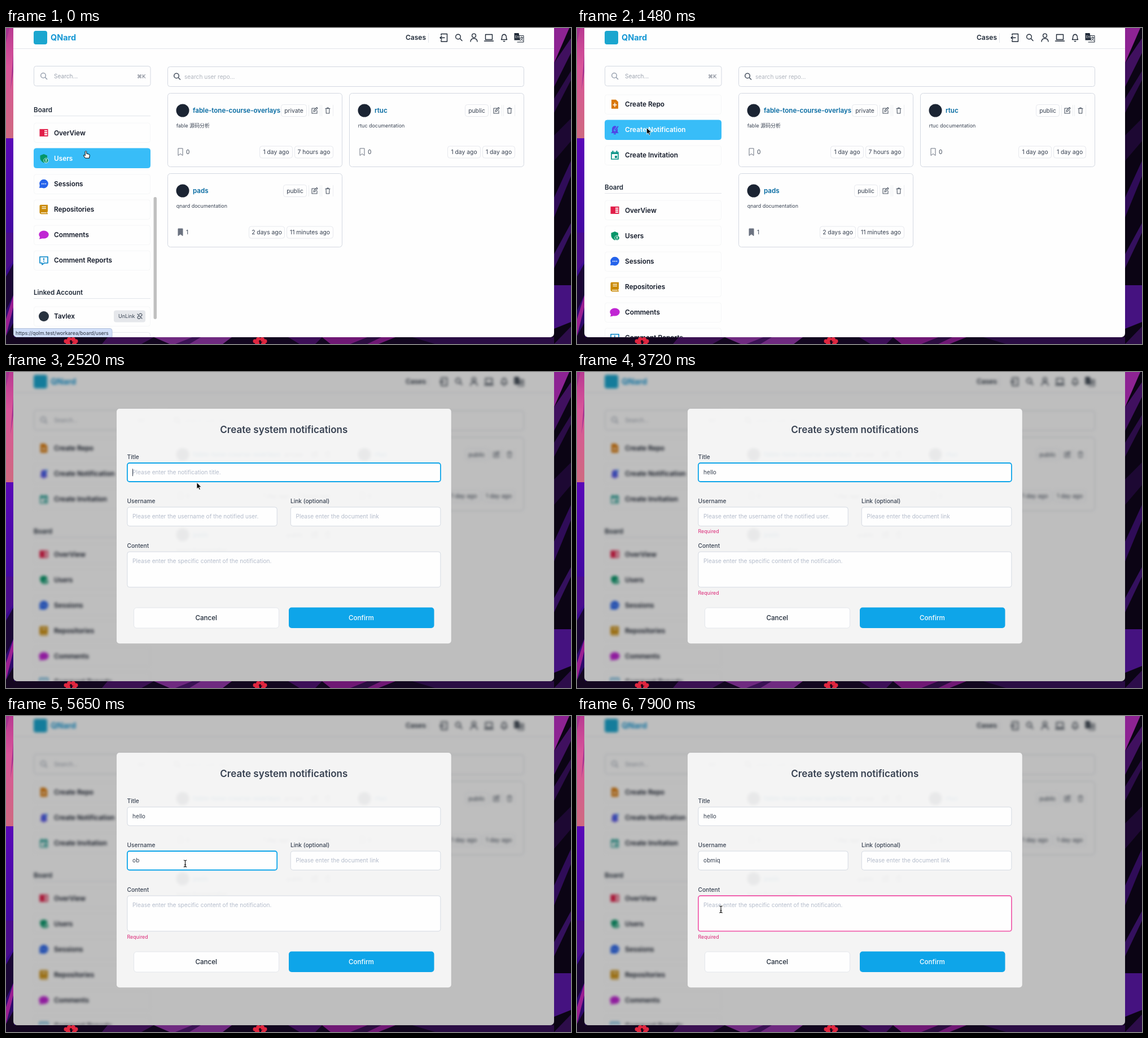
These frames come from a looping animation (1001x559 px, 8 s). An HTML page:

```html
<!DOCTYPE html>
<html lang="en">
<head>
<meta charset="utf-8">
<title>Create notification</title>
<style>
  html, body { margin: 0; width: 100%; height: 100%; overflow: hidden; background: #12061f; }
  svg { display: block; }
  text { font: 400 10.1px Inter, "Noto Sans CJK SC", "Noto Sans CJK", "DejaVu Sans", sans-serif; fill: #374151; }
  .item { font-size: 11.8px; font-weight: 600; fill: #111827; }
  .head { font-size: 11.6px; font-weight: 600; fill: #1f2937; }
  .name { font-size: 11.55px; font-weight: 600; fill: #0369a1; }
  .desc { font-size: 8.95px; fill: #374151; }
  .tag { font-size: 10.35px; text-anchor: middle; }
  .hint { fill: #9ca3af; }
  .ph { font-size: 10.1px; fill: #b4bccb; }
  .val { font-size: 10.1px; fill: #374151; }
  .label { font-size: 10.2px; font-weight: 500; }
  .err { font-size: 8.8px; fill: #db2777; }
  .btn { font-size: 11.6px; font-weight: 500; fill: #1f2937; text-anchor: middle; }
  .box { fill: none; stroke: #d3d8e1; }
  .soft { fill: none; stroke: #e7e9ee; }
  .line { stroke: #e2e5ea; fill: none; }
  .ico { fill: none; stroke: #1f2937; stroke-width: 1.4; stroke-linejoin: round; stroke-linecap: round; }
  .thin { stroke: #4b5563; stroke-width: 1.1; }
  .row rect { fill: #fefefe; stroke: #f5f6f7; }
  .row.on rect { fill: #38bdf8; stroke: #38bdf8; }
  .row.on text { fill: #fff; }
  .field { fill: #fefefe; stroke: #d5dae2; stroke-width: 1; }
  .field.focus { stroke: #0ea5e9; stroke-width: 1.8; }
  .field.focus.bad { stroke: #f062ae; }
  #app.blur { filter: blur(2.6px); }
  #modal { transform-origin: 492.25px 272.5px; }
</style>
</head>
<body>
<svg width="1001" height="559" viewBox="0 0 1001 559">
  <defs>
    <linearGradient id="pink" x2="0" y2="1">
      <stop offset="0" stop-color="#b93a92"/><stop offset=".35" stop-color="#d9559a"/><stop offset="1" stop-color="#cf6a80"/>
    </linearGradient>
    <linearGradient id="violet" x2="0" y2="1">
      <stop offset="0" stop-color="#5a08b8"/><stop offset=".5" stop-color="#4108a0"/><stop offset="1" stop-color="#2a0a5c"/>
    </linearGradient>
    <linearGradient id="grey" x2="0" y2="1">
      <stop offset="0" stop-color="#a9a9a9"/><stop offset="1" stop-color="#7f7f7f"/>
    </linearGradient>
    <filter id="shade" x="-20%" y="-40%" width="140%" height="190%">
      <feDropShadow dx="0" dy="3" stdDeviation="4" flood-opacity=".35"/>
    </filter>
    <clipPath id="win"><path d="M13 0H971V540a7 7 0 0 1-7 7H20a7 7 0 0 1-7-7Z"/></clipPath>
    <clipPath id="side"><rect x="40" y="106" width="222" height="441"/></clipPath>

    <!-- sidebar icons, centred on 0,0 -->
    <g id="file"><path d="M-6-8H2L6-4V8H-6Z" fill="#d97706"/><path d="M0-2.500V5M-3.500 1.300H3.500" stroke="#fff" stroke-width="1.500"/></g>
    <g id="bell"><path d="M-5 4V-1Q-5-6 0-7Q5-6 5-1V4L7 6H-7Z" fill="#4f46e5"/><path d="M-1 2L6-7" stroke="#38bdf8" stroke-width="3.200"/><path d="M0 1L6-6M-2 7.500H2" stroke="#4f46e5" stroke-width="1.800"/></g>
    <g id="cal"><path d="M-6-5H6V7H-6Z" fill="none" stroke="#0d9488" stroke-width="1.700"/><path d="M-6-3H6M-3.500-8V-4M3.500-8V-4" stroke="#0d9488" stroke-width="2"/><path d="M0 1H4V5H0Z" fill="#0d9488"/></g>
    <g id="view"><path d="M-7.500-6.500H7.500V6.500H-7.500Z" fill="#e11d48"/><path d="M1-4.500H6V4.500H1Z" fill="#fff"/><path d="M1-2H6M1 1.500H6" stroke="#e11d48" stroke-width="1.200"/></g>
    <g id="shield"><path d="M-6.500-5L0-7.500L6-5V0Q5 6 0 8Q-6 5-6.500 0Z" fill="#059669"/><circle cx="4" cy="4" r="4.200" fill="#059669" stroke="#fff" stroke-width=".8"/><path d="M2 6Q4 3.500 6 6" fill="#fff"/><circle cx="4" cy="2.800" r="1.200" fill="#fff"/></g>
    <g id="dots"><circle r="7.800" fill="#2563eb"/><path d="M-8 7.500L-7 2L-2 7Z" fill="#2563eb"/><path d="M-4 0h1.700M-.8 0h1.700M2.400 0h1.700" stroke="#fff" stroke-width="1.700"/></g>
    <g id="book"><path d="M-5.500-8H7V4.500H6V7H7V8.500H-5Q-7.500 8-7.500 5.500V-6Q-7.500-8-5.500-8Z" fill="#ca8a04"/><path d="M-3.500-4.500H4M-3.500-1.500H4M-5 6H5" stroke="#fff" stroke-width="1.300"/></g>
    <g id="chat"><ellipse cy="-.5" rx="8.700" ry="7" fill="#c026d3"/><path d="M-8 7.500L-6 1L-1 6Z" fill="#c026d3"/></g>
    <g id="alert"><path d="M-7-6.500H7V4.500H1L-3 7.500V4.500H-7Z" fill="none" stroke="#0284c7" stroke-width="1.600" stroke-linejoin="round"/><path d="M0-4.500V0M0 1.300V2.800" stroke="#0284c7" stroke-width="1.600"/></g>
    <circle id="mark" r="9" fill="#28323f"/>

    <g id="edit" class="ico thin"><path d="M1-4H-4.500V5H4.500V0M-1.500 2L-1-.5L4-5.500L5.500-4L.8 1.300Z"/></g>
    <g id="bin" class="ico thin"><path d="M-4-3.500H4M-3-3.500L-2.700 5H2.700L3-3.500M-1.300-3.500V-5H1.300V-3.500"/></g>
    <path id="flag" d="M-4-6.500H4V6L0 3L-4 6Z" stroke="#6b7280" stroke-linejoin="round"/>
    <g id="lens"><circle r="4.300" cx="-1" cy="-1" fill="none"/><path d="M2.300 2.300L6 6"/></g>
    <g id="bloom" fill="#e0263f"><circle cx="-9" cy="1" r="3.500"/><circle cx="9" cy="1" r="3.500"/><circle cx="-3" cy="-2" r="4"/><circle cx="4" cy="-2" r="4"/><circle cx="-5" cy="5" r="4"/><circle cx="6" cy="6" r="4"/><circle cy="1" r="2" fill="#2a0614"/></g>
  </defs>

  <g id="desk">
    <path d="M0 0H1001V559H0Z" fill="#12061f"/>
    <path d="M0 0H16V195H0Z" fill="url(#pink)"/><path d="M0 0H6L0 26ZM14 30V70L8 110Z" fill="#a5348f"/>
    <path d="M0 195H16V559H0Z" fill="url(#violet)"/>
    <path d="M0 362H14V410L0 430Z" fill="#4a0c8e"/><path d="M0 440L14 415V470L0 500Z" fill="#1a0735"/>
    <path d="M0 515L14 470V490L0 545Z" fill="#9a1f92"/><path d="M0 559V545L14 520V547H100V559Z" fill="#140620"/>
    <path d="M180 547H262L240 559H170Z" fill="#3b1152"/><path d="M262 547H400L384 559H290Z" fill="#6f2a80"/>
    <path d="M300 559L330 547H345L325 559Z" fill="#3a1254"/><path d="M500 547H560L548 559H520Z" fill="#3d0f58"/>
    <path d="M560 547H690L660 559H575Z" fill="#6f1874"/><path d="M610 559L640 547H665L640 559Z" fill="#2b0d40"/>
    <path d="M720 547H971V559H760Z" fill="#2a0d44"/>
    <use href="#bloom" x="115" y="553"/><use href="#bloom" x="450" y="553"/>
    <path d="M971 0H1001V559H971Z" fill="#0b0414"/>
    <path d="M971 0H998L971 62Z" fill="#8d2393"/><path d="M971 62L1001 18V44L971 104Z" fill="#40105f"/>
    <path d="M971 125L1001 76V92L971 150Z" fill="#2b0c48"/><path d="M971 190L1001 160V200L971 235Z" fill="#1d0833"/>
    <path d="M971 300L1001 235V262L971 335Z" fill="#2f0c58"/><path d="M971 400L1001 345V362L971 425Z" fill="#34105e"/>
    <path d="M971 455H1001V520L971 532Z" fill="#451280"/><path d="M971 559L1001 528V559Z" fill="#2d0d4a"/>
  </g>

  <g clip-path="url(#win)">
    <path d="M13 0H971V547H13Z" fill="#fefefe"/>
    <g id="app">
      <rect x="49" y="5" width="24" height="24" rx="4" fill="#1ba6cf"/>
      <text x="79" y="22.300" style="font-size:14.400px;font-weight:700;fill:#1497d4">QNard</text>
      <text x="708" y="21.400" class="item" style="font-size:12px;fill:#1f2937">Cases</text>
      <path class="line" d="M748.500 9V26M13 36.500H971"/>
      <g class="ico">
        <path d="M771 12.500V10.500H781.500V24H771V21.500M769 17.200H777M772 14.500L769 17.200L772 20"/>
        <use href="#lens" x="802" y="16.500"/>
        <circle cx="829" cy="13.500" r="3.400"/><path d="M823 24Q823.500 18.500 829 18.500T835 24"/>
        <path d="M849.500 11.500H861.500V20.500H849.500ZM847.500 23H863.500"/>
        <path d="M877.500 20.500Q878.700 19 878.700 15.500Q879 12 882.500 11.300Q886 12 886.300 15.500Q886.300 19 887.500 20.500ZM881.300 23.500H883.700"/>
        <path d="M909 13.500H917V25H906" stroke-width="1"/><path d="M911 17H916M913.500 15.500V17M915.500 17Q914.500 21 911 22.500M911.500 18.500L916 22.500" stroke-width=".9"/>
      </g>
      <path d="M900.500 9H908.500L911 21.500H900.500Z" fill="#1f2937"/><text x="902" y="17.500" style="font-size:6px;fill:#fff">En</text>

      <rect class="box" x="49.500" y="67.500" width="206.500" height="35" rx="4"/>
      <use href="#lens" x="67" y="85" stroke="#8b95a5" stroke-width="1.300"/>
      <text x="85" y="89" class="hint">Search...</text><text x="232" y="89" style="font-size:9.300px;fill:#6b7280">⌘K</text>
      <rect class="box" x="286.500" y="68.500" width="631" height="35" rx="4"/>
      <use href="#lens" x="303" y="85.500" stroke="#4b5563" stroke-width="1.600"/>
      <text x="316" y="90" class="hint" style="fill:#b0b5be">search user repo...</text>
      <g id="cards"></g>
      <g clip-path="url(#side)"><g id="list"></g></g>
    </g>
    <rect id="thumb" x="261.500" width="5.500" height="216" rx="2.700" fill="#c0c0c0"/>
    <g id="status">
      <path d="M13 531.500H184a4 4 0 0 1 4 4V547H13Z" fill="#d0def8" stroke="#b4c2dc"/>
      <text x="17" y="542.600" style="font-size:8.850px;fill:#28303c">https://qolm.test/workarea/board/users</text>
    </g>
    <path id="dim" d="M13 0H971V547H13Z" opacity=".25"/>
  </g>

  <g id="modal">
    <rect x="196" y="65" width="592.700" height="415.300" rx="5" fill="#f9f9f9" fill-opacity=".93"/>
    <text x="492.300" y="107.500" text-anchor="middle" style="font-size:17px;font-weight:600">Create system notifications</text>
    <g id="form"></g>
    <text class="err" id="userErr" x="214.500" y="285">Required</text>
    <text class="err" id="bodyErr" x="214.500" y="393.500">Required</text>
    <rect x="226.500" y="417" width="257" height="36" rx="5" fill="#fefefe" stroke="#e3e6eb"/><text class="btn" x="354.700" y="439">Cancel</text>
    <rect x="501" y="416.500" width="257.500" height="36.500" rx="5" fill="#0ea5e9"/><text class="btn" x="629.500" y="439" style="fill:#fff">Confirm</text>
    <path id="caret" d="M0-6.500V6.500" stroke="#374151"/>
  </g>

  <g id="tip">
    <rect x="215" y="275" width="225.500" height="50" rx="6" fill="#d2d2d2" stroke="#b4b4b4" stroke-width=".6" filter="url(#shade)"/>
    <rect x="226" y="287" width="26" height="26" rx="6" fill="url(#grey)"/>
    <circle cx="239" cy="294.500" r="4.300" fill="#fff"/><circle cx="239" cy="293" r="1.200" fill="#999"/>
    <path d="M237.500 298H240.500V303L242 304.500L240.500 306L241.500 307.500L239 310L237.500 308.500Z" fill="#fff"/>
    <text x="262" y="292" style="font-size:10.400px;font-weight:700;fill:#111">启用密码自动填充</text>
    <text x="262" y="306" style="font-size:8.900px;fill:#111">单击此处以允许 oVelmu 密码自动填充密</text>
    <text x="262" y="318" style="font-size:8.900px;fill:#111">码。</text>
  </g>

  <g id="pointer">
    <path id="arrow" d="M0 0V11.300L2.700 8.900L4.500 13L6.400 12.100L4.600 8.200H8.200Z" fill="#000" stroke="#fff" stroke-width=".8"/>
    <path id="hand" d="M-1.300 1Q0-.8 1.300 1V4.800L5.500 5.800Q7 6.300 6.800 8L6 12.700H-1L-4 8.600Q-4.500 7-3 7.200L-1.300 8.400Z" fill="#fff" stroke="#000" stroke-linejoin="round"/>
    <g id="beam" fill="none">
      <path d="M-2.700-6Q0-6 0-4V4Q0 6-2.700 6M2.700-6Q0-6 0-4M2.700 6Q0 6 0 4M-1.700 2H1.700" stroke="#fff" stroke-width="2.600"/>
      <path d="M-2.700-6Q0-6 0-4V4Q0 6-2.700 6M2.700-6Q0-6 0-4M2.700 6Q0 6 0 4M-1.700 2H1.700" stroke="#111" stroke-width="1.100"/>
    </g>
  </g>
</svg>

<script>
const $ = id => document.getElementById(id);
const use = (id, x, y) => `<use href="#${id}" x="${x}" y="${y}"/>`;
const text = (cls, x, y, s) => `<text class="${cls}" x="${x}" y="${y}">${s}</text>`;
const tag = (l, r, y, s) =>
  `<rect class="soft" x="${l + .5}" y="${y - 10.5}" width="${r - l - 1}" height="21" rx="4"/>` + text('tag', (l + r) / 2, y + 3.7, s);

// Repository cards
function card(x, y, name, desc, access, saved, created, updated) {
  const w = access === 'private' ? 46 : 42, r = x + 294, mid = y + 30, low = y + 103.5;
  const l = r - updated[1];
  return `<rect class="box" x="${x + .5}" y="${y - .5}" width="309" height="130" rx="5"/>
    <circle cx="${x + 27}" cy="${mid}" r="11.5" fill="#1b2433"/>` +
    text('name', x + 45, mid + 4.3, name) + text('desc', x + 15.7, y + 60, desc) +
    tag(x + 247 - w, x + 247, mid, access) +
    `<path stroke="#eceef1" d="M${x + 250.5} ${mid - 10}v20m20 0v-20m3 0v20m20 0v-20"/>` +
    use('edit', x + 260.5, mid) + use('bin', x + 284, mid) +
    `<use href="#flag" x="${x + 23}" y="${low}" fill="${saved ? '#6b7280' : 'none'}"/>` +
    text('', x + 33, low + 3.7, saved) +
    tag(l - 3 - created[1], l - 3, low, created[0]) + tag(l, r, low, updated[0]);
}
$('cards').innerHTML =
  card(286, 116, 'fable-tone-course-overlays', 'fable 源码分析', 'private', 0, ['1 day ago', 59], ['7 hours ago', 69]) +
  card(608, 116, 'rtuc', 'rtuc documentation', 'public', 0, ['1 day ago', 59], ['1 day ago', 58]) +
  card(286, 258, 'pads', 'qnard documentation', 'public', 1, ['2 days ago', 64], ['11 minutes ago', 83]);

// Sidebar
const rows = [
  ['Create Repo', 'file', -2.3], ['Create Notification', 'bell', 42.9], ['Create Invitation', 'cal', 88],
  ['OverView', 'view', 185.3], ['Users', 'shield', 230.4], ['Sessions', 'dots', 275.6],
  ['Repositories', 'book', 320.8], ['Comments', 'chat', 366], ['Comment Reports', 'alert', 411.2],
  ['Tavlex', 'mark', 510]
];
const heading = (y, s) => text('head', 49, y, s) + `<path class="line" d="M49 ${y + 6.5}H256"/>`;
$('list').innerHTML = rows.map(([s, icon, y]) =>
  `<g class="row"><rect x="49.5" y="${Math.round(y) - 17}" width="206" height="34.500" rx="4"/>${use(icon, 67, y)}${text('item', 85, y + 4.2, s)}</g>`
).join('') + heading(149, 'Board') + heading(472, 'Linked Account') +
  '<rect class="soft" x="49.5" y="538.5" width="206" height="35" rx="4"/>' +
  '<rect x="191" y="499.500" width="56" height="21" rx="4" fill="#e5e7eb"/>' + text('desc', 199, 513.300, 'UnLink') +
  '<path class="ico thin" d="M236 506.500l2-1.500q3 0 3 3l-2 2M238 513l-2 1.500q-3 0-3-3l2-2M233 506l8 8"/>';
const rowEls = [...document.querySelectorAll('.row')];

// Form
const fields = {
  title: ['Title', 214.9, 161, 555, 33, 'Please enter the notification title.'],
  user: ['Username', 214.9, 239, 265.3, 33.5, 'Please enter the username of the notified user.'],
  link: ['Link (optional)', 504.3, 239, 265.6, 33.5, 'Please enter the document link'],
  body: ['Content', 214.9, 318, 555, 62.7, 'Please enter the specific content of the notification.']
};
$('form').innerHTML = Object.entries(fields).map(([id, [label, x, y, w, h, hint]]) =>
  text('label', x - .4, y - 7.3, label) +
  `<rect class="field" id="${id}" x="${x}" y="${y}" width="${w}" height="${h}" rx="4"/>
   <text class="ph" id="${id}Hint" x="${x + 9.2}" y="${y + 20.4}">${hint}</text>
   <text class="val" id="${id}Val" x="${x + 9.2}" y="${y + 20.4}"></text>`).join('');

// Stepped timeline: each entry is [ms, ...values]
const scroll = [[0, 0], [140, 22], [290, 78], [440, 122], [590, 137]];
const pointer = [
  [0, 141.5, 217.5, 'hand'], [440, 141, 217, 'arrow'], [890, 139, 212, 'arrow'], [1040, 133, 200, 'arrow'],
  [1190, 127, 186, 'arrow'], [1340, 124, 178, 'arrow'], [1480, 123.5, 176.5, 'arrow'], [1780, 150, 180, 'arrow'],
  [1930, 204, 184, 'arrow'], [2080, 262, 187, 'beam'], [2230, 310, 190, 'beam'], [2380, 332, 195, 'arrow'],
  [2520, 338, 195.5, 'arrow'], [2970, 0, 0, ''], [4020, 338, 197, 'arrow'], [4170, 335, 206, 'arrow'],
  [4320, 327, 230, 'arrow'], [4470, 319, 255, 'beam'], [4600, 317.5, 261, 'beam'], [6400, 314, 267, 'beam'],
  [6550, 291, 303, 'arrow'], [6700, 267, 334, 'beam'], [7000, 257, 341, 'beam'], [7150, 255, 342, 'beam']
];
const modal = [[0, 1, 0], [1630, .943, .73], [1780, .988, .93], [1930, 1, 1]];
const focus = [[0, ''], [1630, 'title'], [4600, 'user'], [7150, 'body']];
const caret = [[0, 0], [1630, 1], [2080, 0], [2520, 1], [2970, 0], [4600, 1], [4900, 0], [5200, 1], [5650, 0], [7150, 1], [7900, 0]];
const typed = {
  title: [[0, ''], [2970, 'he'], [3120, 'hel'], [3270, 'hell'], [3720, 'hello']],
  user: [[0, ''], [4900, 'ob'], [5950, 'obm'], [6100, 'obmiq']]
};
const at = (track, t) => track.findLast(k => k[0] <= t).slice(1);
const show = (id, on) => $(id).style.display = on ? '' : 'none';

function draw(t) {
  const [dy] = at(scroll, t), [px, py, kind] = at(pointer, t);
  const [scale, alpha] = at(modal, t), [active] = at(focus, t), open = alpha > 0;

  $('list').setAttribute('transform', `translate(0 ${dy})`);
  rowEls.forEach((el, i) => el.classList.toggle('on', !open && Math.abs(rows[i][2] + dy - py) < 17.8));
  $('thumb').setAttribute('y', 299 - dy * .49);
  show('thumb', t < 1040);
  show('status', t < 890);

  $('app').classList.toggle('blur', open);
  show('dim', open);
  show('modal', open);
  $('modal').style.transform = `scale(${scale})`;
  $('modal').style.opacity = alpha;

  for (const id in typed) {
    const [s] = at(typed[id], t);
    $(id + 'Val').textContent = s;
    show(id + 'Hint', !s);
  }
  for (const id in fields) $(id).classList.toggle('focus', id === active);
  const invalid = t >= 2970, noUser = invalid && t < 4900;
  $('user').classList.toggle('bad', noUser);
  $('body').classList.toggle('bad', invalid);
  show('userErr', noUser);
  show('bodyErr', invalid);
  show('tip', t >= 4750 && t < 4900);

  const blink = open && at(caret, t)[0];
  show('caret', blink);
  if (blink) {
    const [, x, y] = fields[active];
    const w = active in typed ? $(active + 'Val').getComputedTextLength() : 0;
    $('caret').setAttribute('transform', `translate(${x + 9.6 + w} ${y + 16.7})`);
  }

  $('pointer').setAttribute('transform', `translate(${px} ${py})`);
  for (const k of ['arrow', 'hand', 'beam']) show(k, k === kind);
}

const start = performance.now();
function tick() {
  draw((performance.now() - start) % 8000);
  requestAnimationFrame(tick);
}
tick();
</script>
</body>
</html>
```
